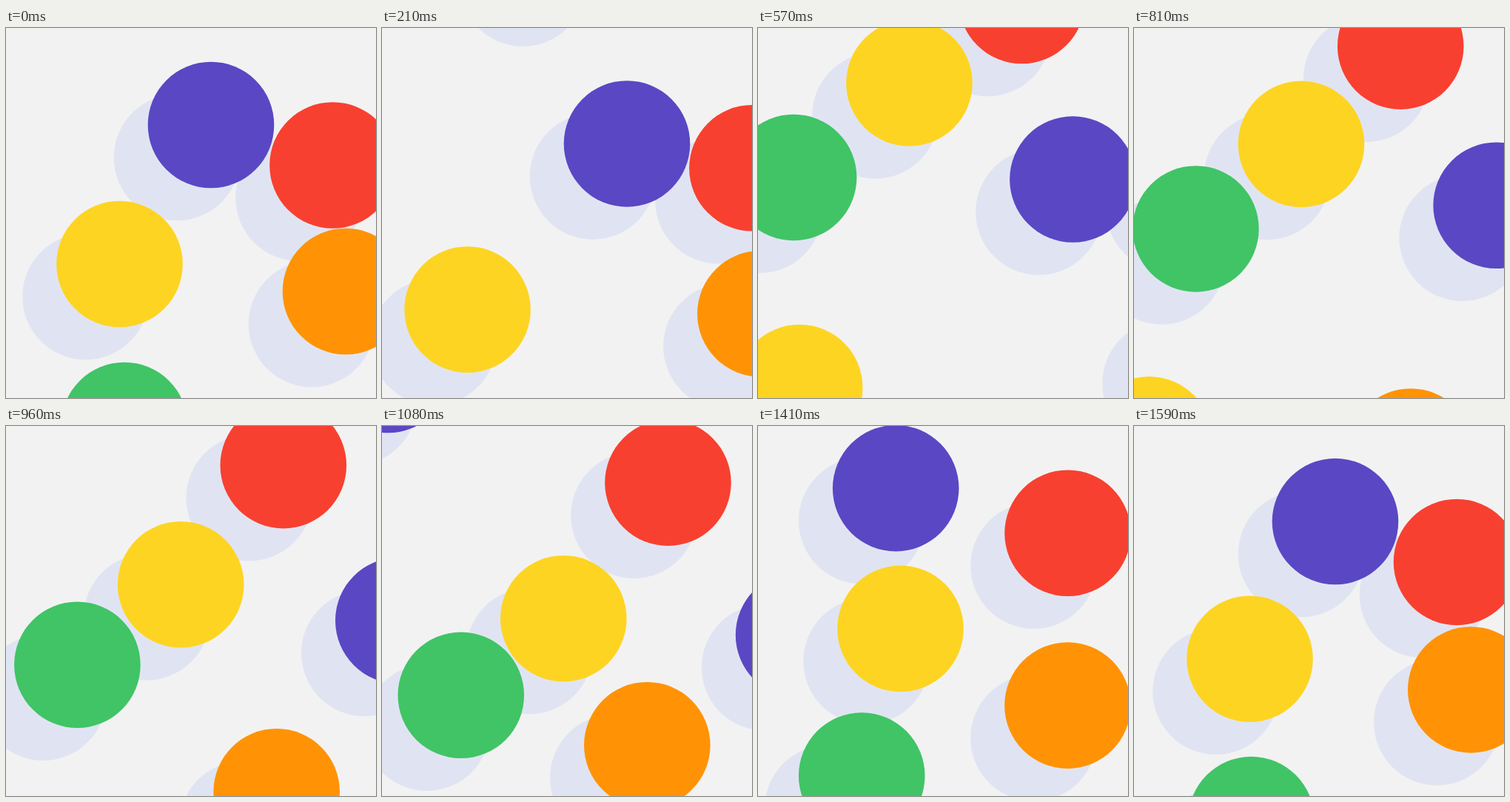
Animation, 500 px wide and 500 px high, one loop 1.62 s. Source, as an HTML page:

```html
<!DOCTYPE html>
<html lang="en">
<head>
<meta charset="utf-8">
<title>Bouncing discs</title>
<style>
  html, body { margin: 0; width: 100%; height: 100%; overflow: hidden; background: #f2f2f2; }
  svg { display: block; width: 100vw; height: 100vh; }
</style>
</head>
<body>
<svg id="stage" viewBox="0 0 500 500">
  <g id="shadows" fill="#e0e4f2"></g>
  <g id="discs"></g>
</svg>
<script>
const STEP = 30;      // ms
const STEPS = 54;
const SEAM = 53.5;    // the last step of a loop covers half the distance
const RADIUS = 85.3;
const REACH = 86.5;   // centre to contact point when two discs meet
const SHADOW = { x: -46, y: 44 };

// Where each disc comes in, how it leaves at the seam, and its steady drift.
const balls = {
  yellow: { color: '#fed422', enter: [{ s: 13, x: 219.5, y: -15 }],
    leave: { x: 153.5, y: 319, vx: -5.6, vy: 8.79 }, ax: 0.05, ay: 0 },
  green: { color: '#40c466', enter: [{ s: 13, x: -30, y: 194.5 }],
    leave: { x: 160, y: 537, vx: 2.9, vy: 9.9 }, ax: 0, ay: 0 },
  red: { color: '#f84030', enter: [{ s: 13, x: 372, y: -100 }, { s: 19, x: 356.5, y: -37 }],
    leave: { x: 441.5, y: 185.5, vx: 8.42, vy: 0.4 }, ax: 0, ay: 0.04 },
  orange: { color: '#ff9305', enter: [{ s: 27, x: 374, y: 572.5 }],
    leave: { x: 459, y: 356, vx: 7.62, vy: 4.37 }, ax: -0.04, ay: -0.016 },
  purple: { color: '#5a47c4', enter: [{ s: 36, x: 8, y: -76 }],
    leave: { x: 277, y: 131, vx: 7.66, vy: 3.5 }, ax: 0.016, ay: 0.039 }
};

// A collision puts both discs on opposite sides of one contact point.
function hit(a, b, s, x, y, degrees) {
  const angle = degrees * Math.PI / 180;
  const dx = REACH * Math.cos(angle);
  const dy = REACH * Math.sin(angle);
  a.path.push({ s, x: x - dx, y: y - dy });
  b.path.push({ s, x: x + dx, y: y + dy });
}

const { yellow, green, red, orange, purple } = balls;
const all = Object.values(balls);

for (const ball of all) ball.path = [...ball.enter];
hit(green, yellow, 20.4, 133.75, 149.5, -38.8);
hit(yellow, red, 23.8, 285.5, 63.5, -40.9);
hit(green, yellow, 36, 176, 312, -36.8);
hit(yellow, orange, 37.3, 302.3, 342.8, 51.8);
hit(purple, yellow, 48.2, 195.8, 187.8, 96.6);
hit(purple, red, 53, 354, 156.5, 18.5);
hit(red, orange, 53.1, 446.4, 270.1, 83.7);
for (const ball of all) ball.path.push({ s: SEAM, x: ball.leave.x, y: ball.leave.y });

function locate({ path, leave, ax, ay }, s) {
  if (s >= SEAM) {
    const d = s - SEAM;
    return {
      x: leave.x + leave.vx * d + ax * d * d / 2,
      y: leave.y + leave.vy * d + ay * d * d / 2
    };
  }
  let i = 1;
  while (s > path[i].s) i++;
  const a = path[i - 1];
  const b = path[i];
  const k = (s - a.s) / (b.s - a.s);
  const sag = (s - a.s) * (b.s - s) / 2;
  return {
    x: a.x + (b.x - a.x) * k - ax * sag,
    y: a.y + (b.y - a.y) * k - ay * sag
  };
}

function addCircle(parent, fill) {
  const c = document.createElementNS('http://www.w3.org/2000/svg', 'circle');
  c.setAttribute('r', RADIUS);
  if (fill) c.setAttribute('fill', fill);
  return document.getElementById(parent).appendChild(c);
}

function place(circle, x, y) {
  circle.setAttribute('cx', x);
  circle.setAttribute('cy', y);
}

// Every disc is drawn twice: coming in, and still leaving from the loop before.
const passes = all.flatMap(ball => [0, SEAM].map(delay => ({
  ball, delay, shadow: addCircle('shadows'), disc: addCircle('discs', ball.color)
})));

function render(ms) {
  const step = Math.floor(ms / STEP) % STEPS;
  for (const { ball, delay, shadow, disc } of passes) {
    const { x, y } = locate(ball, step + delay);
    place(disc, x, y);
    place(shadow, x + SHADOW.x, y + SHADOW.y);
  }
}

const start = performance.now();
function tick() {
  render(performance.now() - start);
  requestAnimationFrame(tick);
}
tick();
</script>
</body>
</html>
```
